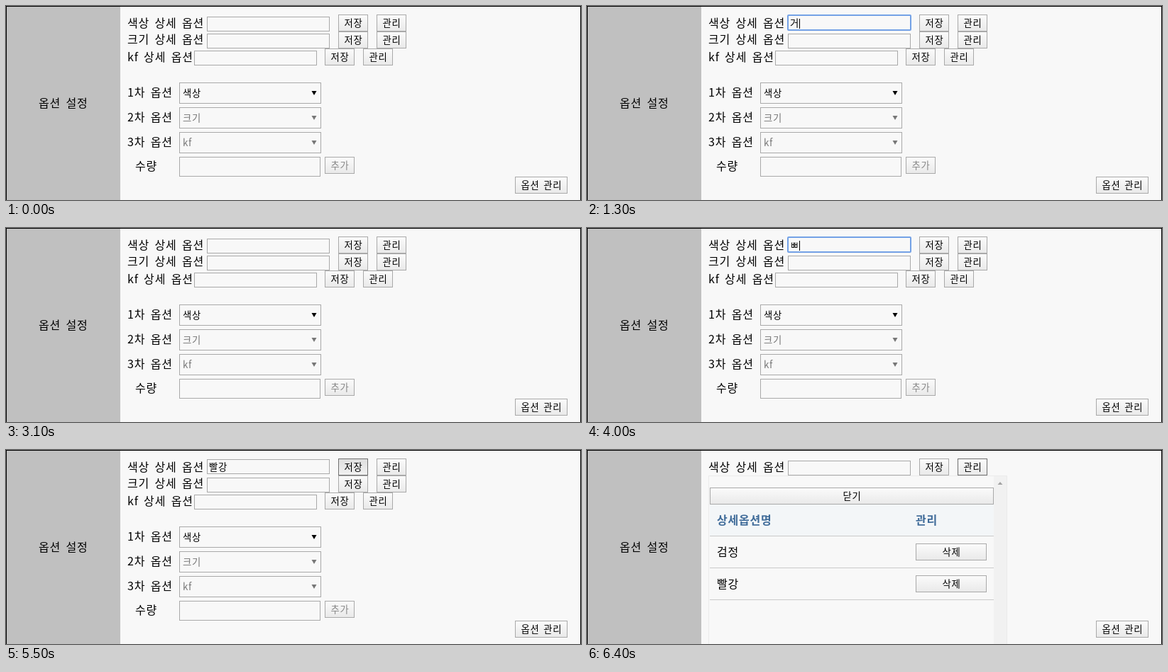
An HTML page for the animation above (8000 ms loop, 810x274 px).

```html
<!DOCTYPE html>
<html lang="ko">
<head>
<meta charset="utf-8">
<title>옵션 설정</title>
<style>
  html, body { margin: 0; width: 810px; height: 274px; overflow: hidden; background: #f8f8f8; }
  svg { display: block; }
  text { font-family: "Noto Sans CJK KR", "Noto Sans CJK", sans-serif; white-space: pre; }
  .label { font-size: 16px; letter-spacing: .8px; word-spacing: 2.2px; }
  .small { font-size: 13.33px; letter-spacing: .73px; word-spacing: 1.3px; }
  .head { font-weight: bold; fill: #3f6b99; }
  .mid { text-anchor: middle; }
</style>
</head>
<body>
<svg id="stage" width="810" height="274" viewBox="0 0 810 274"></svg>
<script>
const stage = document.getElementById('stage');
const LOOP = 8000;

// Each track is a list of [start time, value]
const typed = [[0, ''], [800, 'ㄱ'], [1300, '거'], [1400, '검'], [1500, '검ㅈ'], [1600, '검저'], [1700, '검정'],
  [3000, ''], [3900, 'ㅂ'], [4000, 'ㅃ'], [4100, '빠'], [4200, '빨'], [4300, '빨ㄱ'], [4400, '빨가'], [4500, '빨강'],
  [5600, '']];
const focus = [[0, 0], [500, 1], [2900, 0], [3400, 1], [5500, 0]];
const caret = [[0, 1], [2200, 0], [2700, 1], [5000, 0], [5500, 1]];
// Button states: 0 normal, 1 hovered, 2 pressed
const save = [[0, 0], [2400, 1], [2900, 2], [3000, 1], [3100, 0], [5400, 1], [5500, 2], [5600, 1], [5800, 0]];
const manage = [[0, 0], [100, 1], [200, 0], [5800, 1], [6100, 2], [6300, 1]];
const popupTime = 6400;

const at = (track, t) => track.filter(([start]) => start <= t).pop()[1];

const fill = (x, y, w, h, color) => `<rect x="${x}" y="${y}" width="${w}" height="${h}" fill="${color}"/>`;
const box = (x, y, w, h, stroke = '#a9a9a9', color = '#f8f8f8') =>
  `<rect x="${x + .5}" y="${y + .5}" width="${w - 1}" height="${h - 1}" fill="${color}" stroke="${stroke}"/>`;
const text = (x, cy, str, cls, size, color) =>
  `<text x="${x}" y="${cy + size * .37}" class="${cls}" fill="${color}">${str}</text>`;
const label = (x, cy, str, extra = '') => text(x, cy, str, 'label ' + extra, 16, '#000');
const small = (x, cy, str, color = '#000', extra = '') => text(x, cy, str, 'small ' + extra, 13.33, color);
const arrow = (x, y, color, h = 6) => `<path d="M${x - 3.5} ${y}h7l-3.5 ${h}z" fill="${color}"/>`;

function button(x, y, w, str, state = 0, color = '#000') {
  return box(x, y, w, 24, state ? '#707070' : '#a9a9a9', `url(#${state > 1 ? 'down' : 'up'})`) +
    small(x + w / 2 + .4, y + 12, str, color, 'mid');
}

function select(y, name, str, color) {
  return label(171, y + 14.5, name) + box(244, y, 200, 30) +
    small(249, y + 15, str, color) + arrow(434, y + 12, color);
}

function optionInput(t) {
  const str = at(typed, t), y = str ? 13 : 15;
  let out = box(283, y, 173, 21);
  if (at(focus, t)) {
    out += `<rect x="283" y="${y}" width="173" height="21" rx="1" fill="none" stroke="#73a1e6" stroke-width="2"/>`;
    if (at(caret, t)) out += fill(286 + 13 * str.length, y + 5, 1, 14, '#000');
  }
  return out + small(286, 24.5, str);
}

function popupRow(y, str) {
  return label(183, y + 22, str) + button(463, y + 10, 100, '삭제') + fill(173, y + 44, 400, 1, '#cacaca');
}

function popup() {
  return box(171, 36, 421, 260, '#ebebeb') + fill(573, 37, 18, 237, '#f1f1f1') + arrow(582, 49, '#a3a3a3', -4) +
    button(173, 53, 400, '닫기') +
    fill(173, 77, 400, 44, '#f3f6f8') + fill(173, 121, 400, 1, '#cacaca') +
    label(183, 99, '상세옵션명', 'head') + label(463, 99, '관리', 'head') +
    popupRow(122, '검정') + popupRow(167, '빨강');
}

function scene(t) {
  return `<defs>
    <linearGradient id="up" x2="0" y2="1"><stop stop-color="#fbfbfb"/><stop offset="1" stop-color="#e9e9e9"/></linearGradient>
    <linearGradient id="down" x2="0" y2="1"><stop stop-color="#dedede"/><stop offset="1" stop-color="#f2f2f2"/></linearGradient>
  </defs>` +
    box(0, 0, 810, 300, '#000') + fill(1, 1, 160, 273, '#c0c0c0') + label(46, 137.5, '옵션 설정') +
    label(171, 24, '색상 상세 옵션') + optionInput(t) +
    button(468, 12, 42, '저장', at(save, t)) + button(522, 12, 42, '관리', at(manage, t)) +
    label(171, 47.5, '크기 상세 옵션') + box(283, 39, 173, 21) +
    button(468, 36, 42, '저장') + button(522, 36, 42, '관리') +
    label(171, 72, 'kf 상세 옵션') + box(265, 63, 173, 21) +
    button(449, 60, 42, '저장') + button(503, 60, 42, '관리') +
    select(108, '1차 옵션', '색상', '#000') +
    select(143, '2차 옵션', '크기', '#777') +
    select(178, '3차 옵션', 'kf', '#777') +
    label(182, 226, '수량') + box(244, 213, 199, 28) + button(449, 213, 42, '추가', 0, '#888') +
    button(717, 241, 74, '옵션 관리') +
    (t >= popupTime ? popup() : '');
}

let shown = '';
function frame() {
  const next = scene(performance.now() % LOOP);
  if (next !== shown) stage.innerHTML = shown = next;
  requestAnimationFrame(frame);
}
frame();
</script>
</body>
</html>
```
